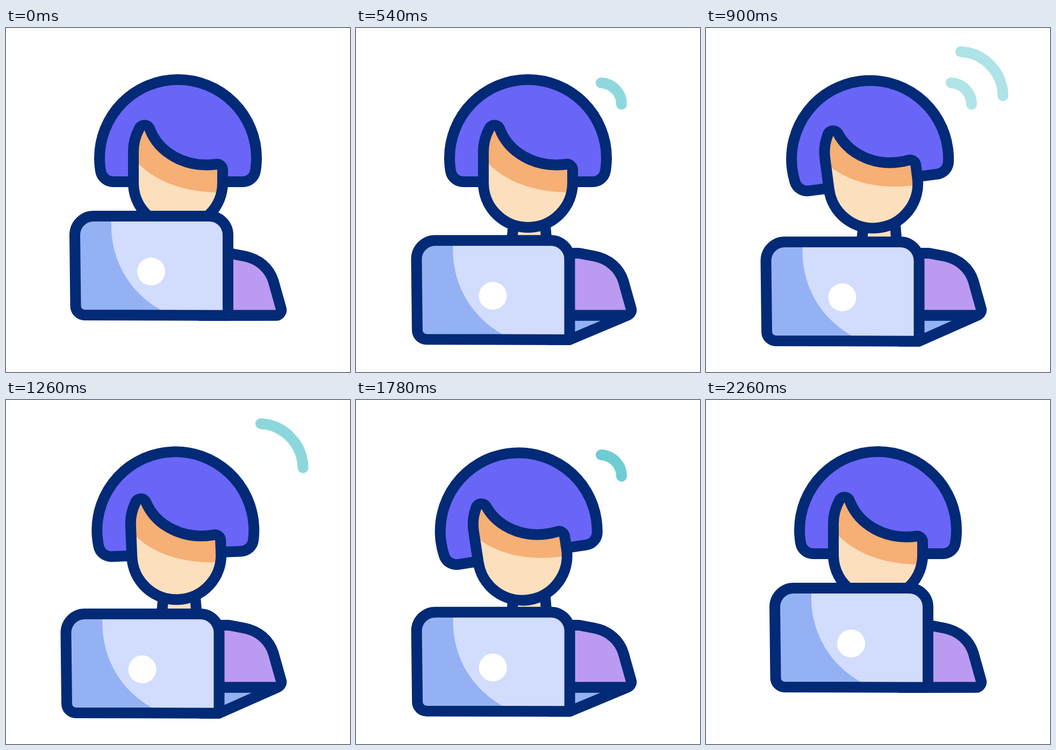
These frames come from a looping animation (640 by 640 pixels, 2400 ms). An HTML page:

```html
<!DOCTYPE html>
<html lang="en">
<head>
<meta charset="utf-8">
<title>Working at a laptop</title>
<style>
  html, body { margin: 0; width: 100%; height: 100%; overflow: hidden; background: #fff; }
  svg { display: block; width: 100%; height: 100%; }
  .line { fill: none; stroke: #032a76; stroke-width: 20; stroke-linejoin: round; }
  .wave { fill: none; stroke: #6ecdd3; stroke-width: 20; stroke-linecap: round; }
</style>
</head>
<body>
<svg viewBox="0 0 640 640">
  <defs>
    <path id="faceShape" d="M237 288V230C237 213 241 200 247.500 188A10.500 10.500 0 0 1 267 187C284 232 334 261 391 253.500A10.500 10.500 0 0 1 403 264V288A83 83 0 0 1 237 288Z"/>
    <path id="lidShape" d="M146 534L413 534.700V385A35 35 0 0 0 378 350H163A35 35 0 0 0 128 385L129.500 517A17 17 0 0 0 146 534Z"/>
    <clipPath id="faceClip"><use href="#faceShape"/></clipPath>
    <clipPath id="lidClip"><use href="#lidShape"/></clipPath>
  </defs>

  <!-- neck -->
  <path class="line" style="fill:#fcdfbd" d="M293.500 360L290.500 390V410H354V390L351.500 360"/>

  <g id="head">
    <path class="line" style="fill:#6965f7" d="M237 286H200C188 286 178 278 176 266C174.700 258 174 250 174 242A146 146 0 0 1 466 242C466 250 465.300 258 464 266C462 278 452 286 440 286H403"/>
    <use href="#faceShape" fill="#fcdfbd"/>
    <g clip-path="url(#faceClip)">
      <path id="shade" fill="#f6af74" d="M230 160H410V306H393C335 305 282 288 247 253L230 236Z"/>
    </g>
    <use href="#faceShape" class="line"/>
  </g>

  <path id="base" class="line" style="fill:#94b2f3"/>

  <!-- body -->
  <path class="line" style="fill:#bb9af2" d="M360 419H415L444 424.500C470 429.500 490 447 497.500 471L511.600 521.200A10 10 0 0 1 502 534.500H360Z"/>

  <g id="lid">
    <use href="#lidShape" fill="#d2dcfd"/>
    <path fill="#94b2f3" clip-path="url(#lidClip)" d="M196 340V372A178 178 0 0 0 287 524V540H120V340Z"/>
    <circle cx="270" cy="453" r="26" fill="#fff"/>
    <use href="#lidShape" class="line"/>
  </g>

  <path id="inner" class="wave" d="M456 102A40 40 0 0 1 494 142"/>
  <path id="outer" class="wave" d="M474 44A83.500 83.500 0 0 1 552.500 126"/>
</svg>
<script>
const LOOP = 2400;
const [head, shade, base, lid, inner, outer] =
  ["head", "shade", "base", "lid", "inner", "outer"].map(id => document.getElementById(id));

const clamp = p => Math.min(1, Math.max(0, p));

// Eased 0 to 1 between two times.
function ease(t, from, to) {
  const p = clamp((t - from) / (to - from));
  return p * p * (3 - 2 * p);
}

// Linear fade in from the start, fade out towards the end.
const pulse = (t, start, end, rise, fall) =>
  clamp(Math.min((t - start) / rise, (end - t) / fall));

function draw(t) {
  const open = ease(t, 200, 600) - ease(t, 1700, 2200);
  const dx = -16.5 * open, dy = 48 * open;
  lid.setAttribute("transform", `translate(${dx} ${dy})`);
  base.setAttribute("d", `M360 534.5H505L${413 + dx} ${534.7 + dy}H360Z`);

  // Two nods of 800 ms each.
  const nod = Math.sin(Math.PI * clamp((t - 600) / 1600) * 2) ** 2;
  head.setAttribute("transform", `rotate(${-8.7 * nod} 326 357)`);
  shade.setAttribute("transform", `translate(0 ${-5.5 * nod})`);

  inner.style.opacity = pulse(t, 200, 1200, 440, 560) + pulse(t, 1260, 2260, 350, 480);
  outer.style.opacity = pulse(t, 600, 1700, 550, 550) + pulse(t, 1800, 2260, 230, 230);
}

const start = performance.now();
function tick() {
  draw((performance.now() - start) % LOOP);
  requestAnimationFrame(tick);
}
tick();
</script>
</body>
</html>
```
